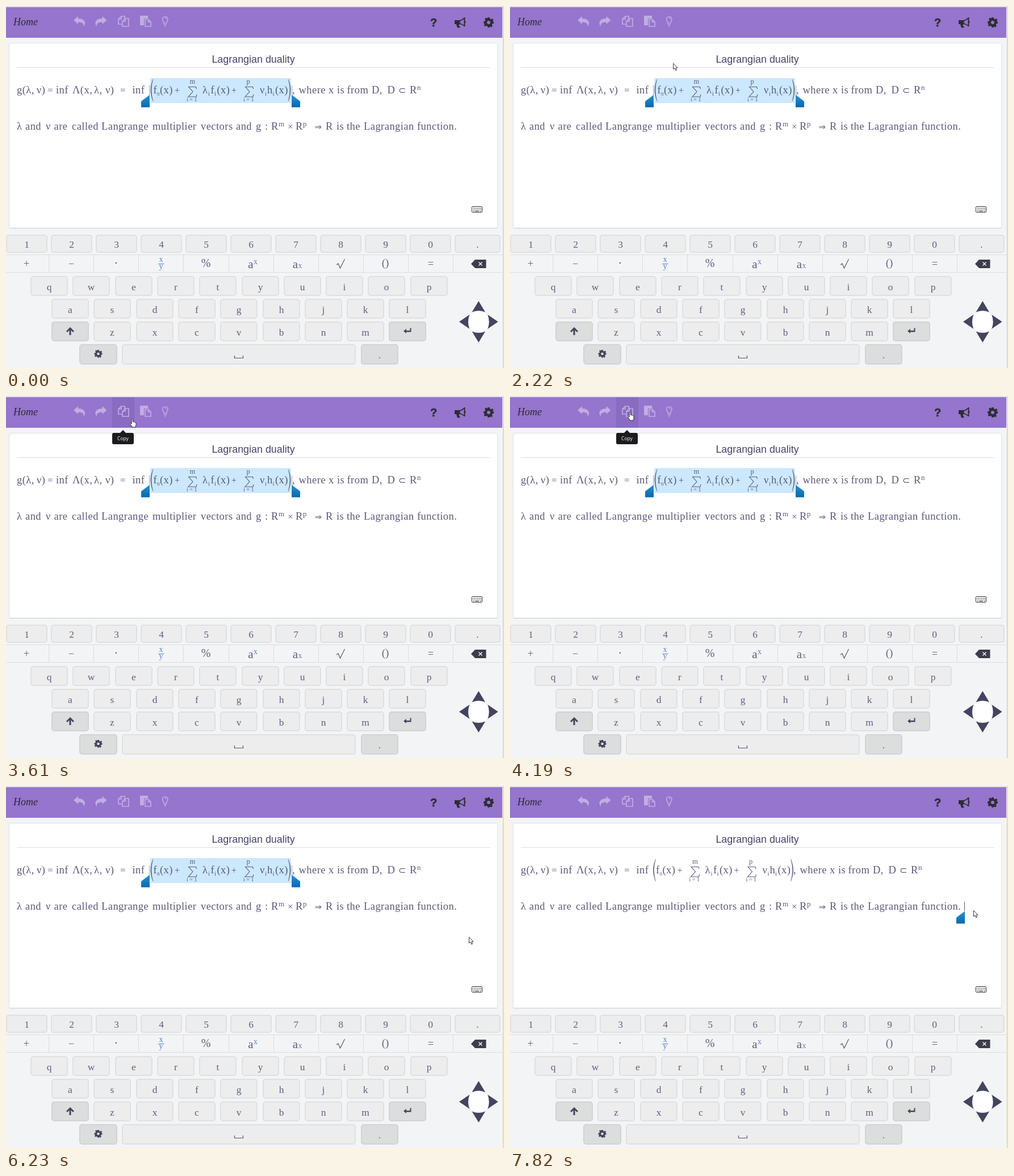
An HTML page for the animation above (8 s loop, 877 px wide and 638 px high).

```html
<!DOCTYPE html>
<html lang="en">
<head>
<meta charset="utf-8">
<title>Equation editor</title>
<style>
html, body { margin: 0; width: 100%; height: 100%; overflow: hidden; background: #f3f4f6; }
svg { display: block; }
text { font-family: "Liberation Serif", "DejaVu Sans", serif; fill: #5a5a7a; white-space: pre; }
.body { letter-spacing: .45px; }
.small { letter-spacing: 0; }
.sans { font-family: "Liberation Sans", sans-serif; fill: #44446a; }
</style>
</head>
<body>
<svg id="stage" width="877" height="638" viewBox="0 0 877 638">
  <defs>
    <linearGradient id="blue" x2="0" y2="1"><stop stop-color="#2492dc"/><stop offset="1" stop-color="#0768ad"/></linearGradient>
    <path id="handle" d="M0 0V22H-15V11.500Z" fill="url(#blue)"/>
    <path id="gear" d="M-1.6-9H1.6L2.2-6.5 4.2-5.6 6.4-7 8.6-4.6 7-2.4 7.5-1.6 9-1.5V1.6L6.6 2.2 5.7 4.1 7 6.3 4.7 8.5 2.6 7 1.6 8.8H-1.6L-2.2 6.6-4.2 5.7-6.3 7-8.5 4.7-7 2.6-7.4 1.7-9 1.6V-1.6L-6.6-2.2-5.7-4.2-7-6.3-4.7-8.5-2.6-7ZM0-3A3 3 0 1 0 0 3 3 3 0 1 0 0-3Z" fill-rule="evenodd"/>
    <path id="undo" d="M0 7 8 0V4C15 4 20 7 20 12.500 20 15 19 16.500 17.500 18 18.500 12.500 15 10.500 8 10.500V14Z"/>
  </defs>

  <rect width="877" height="638" fill="#f3f4f6"/>
  <rect width="877" height="2" fill="#e4e4e6"/>
  <rect y="2" width="874" height="54" fill="#9575cd"/>
  <rect id="hover" y="2" width="39" height="54" fill="#896bc1"/>
  <text x="13" y="34" font-size="18" font-style="italic" style="fill:#2d2935">Home</text>

  <g fill="#c0ade3">
    <use href="#undo" x="119" y="18"/>
    <use href="#undo" transform="translate(177.500 18) scale(-1 1)"/>
    <path d="M236 17H250V22H243V34H236Z"/>
  </g>
  <g fill="none" stroke="#c0ade3" stroke-width="1.700">
    <path d="M204 32H198V23L203 18H209V22M203 18V23H198M205 36V27L210 22H216V36ZM210 22V27H205"/>
    <path d="M245 23.500H250.500L255 28V36H245ZM250.500 23.500V28H255"/>
    <path d="M278 30.500C278 27.500 275.500 26.500 275.500 23A4.800 4.800 0 0 1 285 23C285 26.500 282.500 27.500 282.500 30.500ZM278 33H282.500M279 35.500H281.500M280.500 21 282.500 23" stroke-width="1.500"/>
  </g>
  <g fill="#2d2d32">
    <text x="753" y="36" font-size="20" font-weight="bold" text-anchor="middle" class="sans" style="fill:#2d2d32;stroke:#2d2d32;stroke-width:.6">?</text>
    <path d="M790 25H797C801 25 804 23 807 20H808.500V26.500Q811 28 808.500 30V36H807C804 33.500 801 32 798 32Q797 35 800 37.500 797 39.500 794.500 37.500L793 32H790ZM806.500 23Q803 26 799.500 26.700V30.200Q803 31 806.500 33.500Z" fill-rule="evenodd"/>
    <use href="#gear" x="850" y="29"/>
  </g>

  <rect x="5.500" y="65.500" width="860" height="326" rx="2" fill="#fff" stroke="#dfe0e3"/>
  <path d="M6 391.500H865" stroke="#cbccd0"/>
  <path d="M19 108.500H852" stroke="#dcdcde"/>
  <text x="435.500" y="100" font-size="17.900" text-anchor="middle" class="sans">Lagrangian duality</text>

  <g id="selection">
    <rect x="254" y="127" width="248" height="44" fill="#cce8ff"/>
    <path d="M252.500 140V158M503.500 140V158" stroke="#9aa6bd"/>
    <use href="#handle" x="253" y="156.500"/>
    <use href="#handle" transform="translate(503 156.500) scale(-1 1)"/>
  </g>
  <g id="words"></g>
  <g id="formula"></g>
  <g id="tail"></g>
  <g id="caret">
    <path d="M800.500 204V220" stroke="#55557a"/>
    <use href="#handle" x="801" y="220.500"/>
  </g>

  <g fill="none" stroke="#2c2c38">
    <rect x="820.500" y="353.500" width="18" height="10" rx="1"/>
    <path d="M823 356.500H837M823 359H837" stroke-dasharray="1.500 1"/>
    <path d="M823 361.500H824.500M826 361.500H833M835 361.500H836.500"/>
  </g>

  <g id="keys"></g>
  <path id="grid" fill="none" stroke="#dcdde0"/>
  <g id="labels"></g>

  <path d="M268 454.500H278.500" stroke="#5c84c0"/>
  <path d="M582 456 585 454 588.500 462 596.500 446" fill="none" stroke="#5a5a7a" stroke-width="1.200"/>
  <path d="M819 454.500 826 447H845.500V462H826Z" fill="#3d3d4c"/>
  <path d="M832.500 451.500 838.500 457.500M838.500 451.500 832.500 457.500" stroke="#fff" stroke-width="1.300"/>
  <g fill="#44445f">
    <path d="M113 566 120 573 118 575 114.500 571.500V580H111.500V571.500L108 575 106 573Z"/>
    <path d="M700 573 705 569V572H711.500V567.500H713.500V574.500H705V577Z"/>
    <use href="#gear" transform="translate(162.500 613) scale(.78)"/>
  </g>
  <path d="M402.500 616V620.500H417.500V616" fill="none" stroke="#55556f" stroke-width="1.200"/>
  <circle cx="832.300" cy="556.500" r="19" fill="#fff"/>
  <g id="pad" fill="#44445f"></g>

  <rect id="edge" x="875" width="1" height="638"/>
  <rect id="rim" x="876" width="1" height="638"/>

  <g id="tip">
    <path d="M201 65 206 60 211 65Z" fill="#1c1c1f"/>
    <rect x="187" y="65" width="38" height="20" rx="3" fill="#1c1c1f"/>
    <text x="206" y="78" font-size="8.500" text-anchor="middle" style="font-family:'Open Sans',sans-serif;fill:#fff">Copy</text>
  </g>
  <g id="pointer" fill="#fff" stroke="#222" stroke-width=".9" stroke-linejoin="round">
    <path id="arrow" d="M.5.500V11L3 8.900 4.800 13 6.600 12.200 4.900 8.300H8Z"/>
    <path id="hand" d="M3.200 9V1.500Q4.500 0 5.500 1.500V5.500Q7 4.800 7.600 6 9 5.400 9.600 6.700 11 6.500 11 8V11Q10.500 13 9.800 15H4.500Q3 12 .600 9.500.500 7.500 3.200 9Z"/>
  </g>
</svg>
<script>
const $ = id => document.getElementById(id);
const NS = "http://www.w3.org/2000/svg";

function add(parent, name, attrs, content = "") {
  const el = document.createElementNS(NS, name);
  for (const key in attrs) el.setAttribute(key, attrs[key]);
  el.textContent = content;
  $(parent).append(el);
  return el;
}
const put = (parent, content, x, y, size = 18.5) =>
  add(parent, "text", { x, y, "font-size": size, class: size < 14 ? "small" : "body" }, content);

const run = (parent, y, list) =>
  list.forEach(([content, x, lift = 0, size]) => put(parent, content, x, y + lift, size));

// Document text
run("words", 154, [
  ["g(λ,", 19], ["ν)", 54], ["=", 73, 0, 17], ["inf", 88], ["Λ(x,", 117], ["λ,", 155], ["ν)", 175],
  ["=", 201, 0, 17], ["inf", 222.5]
]);
run("words", 218, [
  ["λ", 19], ["and", 34], ["ν", 70], ["are", 84.5], ["called", 116], ["Langrange", 168],
  ["multiplier", 258], ["vectors", 343], ["and", 405], ["g", 440], [":", 456], ["R", 467],
  ["m", 480, -6, 13], ["×", 496, 0, 17], ["R", 510], ["p", 523, -6, 13], ["⇒", 543.5, 0, 15],
  ["R", 563], ["is", 582], ["the", 600], ["Lagrangian", 630], ["function.", 724]
]);
run("formula", 154, [
  ["f", 259.5], ["0", 266, 4, 9], ["(x)", 271], ["+", 297, 0, 16],
  ["λ", 346], ["i", 356, 4, 11], ["f", 360.5], ["i", 367, 4, 11], ["(x)", 371.5], ["+", 397, 0, 16],
  ["ν", 447], ["i", 456, 4, 11], ["h", 460], ["i", 469.5, 4, 11], ["(x)", 474]
]);
[[328, "m"], [428, "p"]].forEach(([x, limit]) => {
  put("formula", limit, x - 4.5, 137, 12.5);
  put("formula", "i = 1", x - 10, 168, 10);
  add("formula", "path", {
    d: `M${x + 7.5} 146 ${x + 6.5} 142.500H${x - 6.5}L${x + 1} 151 ${x - 7} 160H${x + 7}L${x + 8} 156`,
    fill: "none", stroke: "#5a5a7a", "stroke-width": 1.1
  });
});
add("formula", "path", {
  d: "M259 129Q250.500 148 259 168Q253 148 259 129M497 129Q505.500 148 497 168Q503 148 497 129",
  fill: "#5a5a7a", stroke: "#5a5a7a", "stroke-width": .4
});
run("tail", 154, [
  [",", 504], ["where", 515.5], ["x", 568], ["is", 583], ["from", 600.5], ["D,", 644],
  ["D", 671.5], ["⊂", 691, 0, 16], ["R", 711], ["n", 724, -6, 13]
]);

// Keyboard
function key(x, y, width, height, label, dark) {
  x = Math.round(x);
  add("keys", "rect", {
    x: x + 1, y: y + 1, width: width - 2, height: height - 2, rx: 4,
    fill: dark ? "#dcdddd" : "#ededee", stroke: dark ? "#d2d3d4" : "#dfe0e1", "stroke-width": 2
  });
  caption(label, x + width / 2, y + (height < 34 ? 22.5 : 24.5), 17.5);
}
function caption(label, x, y, size, color = "#5f5f80") {
  add("labels", "text", { x, y, "font-size": size, "text-anchor": "middle", style: `fill:${color}` }, label);
}
[..."1234567890."].forEach((label, i) => key(79 * i, 403, i == 10 ? 81 : 73, 32, label));
[["qwertyuiop", 43, 476], ["asdfghjkl", 80, 516], [" zxcvbnm ", 80, 556]].forEach(([row, x, y]) =>
  [...row].forEach((label, i) => key(x + 74.3 * i, y, 66, 35, label, label == " ")));
key(129, 596, 67, 36, "", true);
key(204, 596, 412, 36, "");
key(625, 596, 66, 36, ".", true);

let lines = "M0 438.500H874M0 469.500H874";
for (let i = 0; i < 10; i++) lines += `M${Math.round(75 + 79.15 * i) + .5} 438V469`;
$("grid").setAttribute("d", lines);

const BLUE = "#5c84c0";
[["+", 36, 460, 18], ["−", 115, 460, 18], ["·", 194, 460, 22], ["%", 352, 460, 20],
 ["a", 431, 462, 21], ["x", 439.5, 455, 14, BLUE], ["a", 509.5, 462, 21], ["x", 518, 462, 14, BLUE],
 ["x", 273, 451, 14, BLUE], ["y", 273, 463, 14, BLUE], ["()", 668, 458.5, 19], ["=", 748, 460, 18]
].forEach(item => caption(...item));

for (let turn = 0; turn < 360; turn += 90)
  add("pad", "path", {
    d: "M0-36.500 12.500-17Q0-22 -12.500-17Z",
    transform: `translate(832.300 556.500) scale(.94 1) rotate(${turn})`
  });

// Pointer moves: first step, last step, step count, destination
const moves = [
  [540, 540, 1, 614, 449], [660, 790, 2, 492, 259], [1040, 1160, 2, 398, 187],
  [1310, 1310, 1, 342, 146], [1470, 1470, 1, 341, 143], [1770, 1770, 1, 332, 141],
  [1930, 2660, 9, 231, 50], [2750, 2940, 3, 218, 40], [3860, 4190, 4, 207, 28],
  [4920, 5430, 6, 208, 197], [5720, 5930, 3, 728, 315], [6230, 6230, 1, 815, 266],
  [6330, 6530, 3, 825, 243], [6630, 6830, 3, 822, 228], [7030, 7160, 2, 817, 220],
  [7310, 7310, 1, 816, 219]
];

function pointerAt(time) {
  let x = 614, y = 449;
  for (const [start, end, steps, toX, toY] of moves) {
    if (time < start) break;
    const gap = (end - start) / (steps - 1) || 1;
    const part = Math.min(steps, Math.floor((time - start) / gap + 1.001)) / steps;
    x += (toX - x) * part;
    y += (toY - y) * part;
    if (part < 1) break;
  }
  return [x, y];
}

function tipOpacity(time) {
  if (time < 3340 || time >= 4920) return 0;
  if (time >= 4820) return .22;
  if (time >= 4710) return .65;
  return Math.min(1, (Math.floor((time - 3340) / 90) + 1) / 4);
}

const show = (id, on) => $(id).setAttribute("visibility", on ? "visible" : "hidden");

function render(time) {
  const [x, y] = pointerAt(time);
  const overBar = time >= 540 && y < 52 && x < 265;
  const cleared = time >= 7820;
  const lit = time >= 4500;

  $("pointer").setAttribute("transform", `translate(${x} ${y})`);
  $("pointer").setAttribute("display", time >= 540 ? "inline" : "none");
  show("arrow", !overBar);
  show("hand", overBar);
  show("hover", overBar);
  $("hover").setAttribute("x", x < 222 ? 187 : 226);
  $("tip").setAttribute("opacity", tipOpacity(time));
  $("edge").setAttribute("fill", lit ? "#d6d07c" : "#c6c7ca");
  $("rim").setAttribute("fill", lit ? "#f6f2bc" : "#ececee");

  show("selection", !cleared);
  show("caret", cleared);
  $("formula").setAttribute("transform", `translate(${cleared ? -2.5 : 0} 0)`);
  $("tail").setAttribute("transform", `translate(${cleared ? -5 : 0} 0)`);
}

const began = performance.now();
function tick() {
  render((performance.now() - began) % 8000);
  requestAnimationFrame(tick);
}
tick();
</script>
</body>
</html>
```
